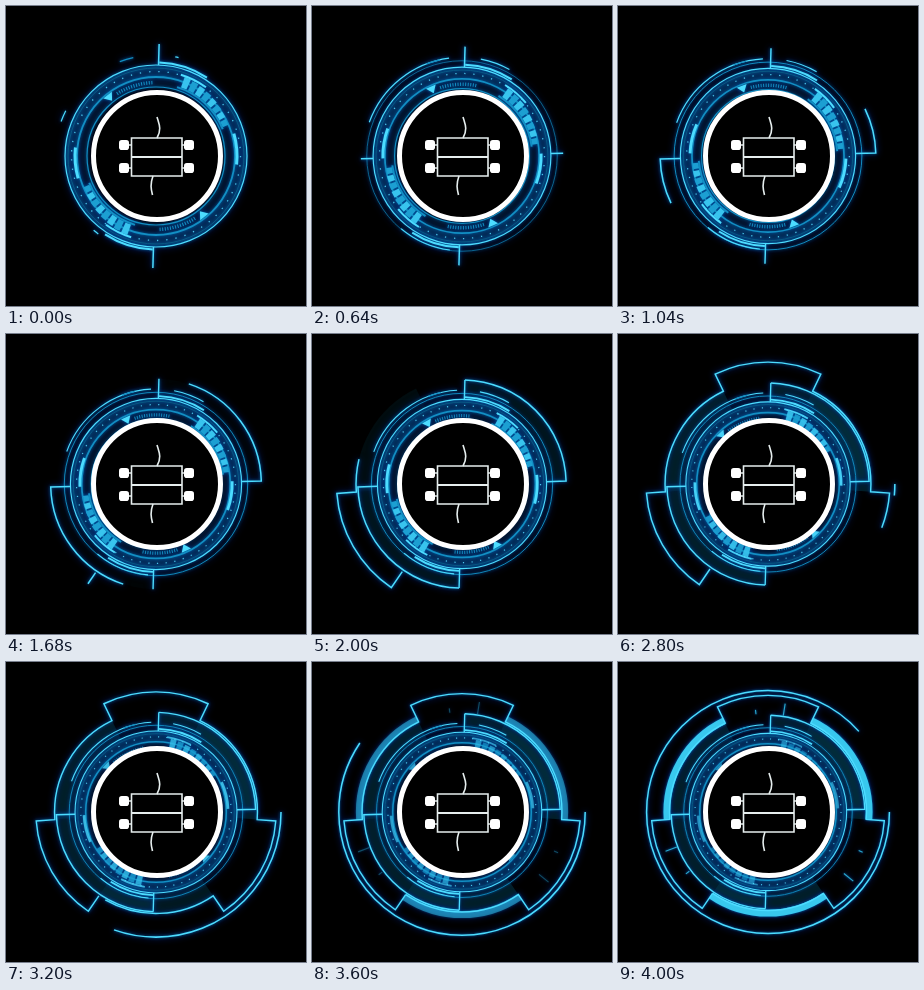
These frames come from a looping animation (300x300 px, 4.08 s). An HTML page:

```html
<!DOCTYPE html>
<html lang="en">
<head>
<meta charset="utf-8">
<title>HUD ring</title>
<style>
html, body { margin: 0; width: 100%; height: 100%; overflow: hidden; background: #000; }
svg { display: block; width: 100vw; height: 100vh; }
#lines { filter: drop-shadow(0 0 1.5px #0068a8) drop-shadow(0 0 3.5px #001a70); }
</style>
</head>
<body>
<svg viewBox="0 0 300 300">
  <g id="zoom" fill="none">
    <g id="back"></g>
    <g id="lines">
      <g id="rings"></g>
      <g id="spin"></g>
      <g id="outer"></g>
    </g>
  </g>
  <circle cx="151" cy="150" r="63.5" fill="#000" stroke="#fff" stroke-width="5"/>
  <g fill="none" stroke="#e6eeee" stroke-width="1.6">
    <path d="M125.5 132H176V170H125.5ZM122 139H126M122 162H126M176 139H180M176 162H180"/>
    <path d="M125 151H176" stroke-width="2.2"/>
    <path d="M151 132C156 123 153 118 151 111M147 170C144 178 145 183 146.500 189"/>
    <g fill="#fff" stroke="none" id="wheels"></g>
  </g>
</svg>
<script>
const LOOP = 4080, STEP = 80;
const CYAN = '#4cdcff', BLUE = '#128fc4', DIM = '#0a5a84', SHADE = '#053a46';
const $ = id => document.getElementById(id);
const clamp = v => Math.max(0, Math.min(1, v));

function add(parent, tag, attrs) {
  const el = document.createElementNS('http://www.w3.org/2000/svg', tag);
  for (const k in attrs) el.setAttribute(k, attrs[k]);
  return $(parent).appendChild(el);
}

function pt(r, deg) {
  const a = deg * Math.PI / 180;
  return (r * Math.cos(a)).toFixed(2) + ' ' + (r * Math.sin(a)).toFixed(2);
}

// Arc continuing from the current point, already at radius r and angle a.
function sweep(r, a, b) {
  const large = Math.abs(b - a) > 180 ? 1 : 0;
  return `A${r} ${r} 0 ${large} ${b > a ? 1 : 0} ${pt(r, b)}`;
}
const arc = (r, a, b) => 'M' + pt(r, a) + sweep(r, a, b);
const spoke = (r, q, a) => `M${pt(r, a)}L${pt(q, a)}`;
const sector = (r, q, a, b) =>
  arc(r, a, b) + 'L' + pt(q, b) + sweep(q, b, a) + 'Z';

const line = (parent, d, stroke, width, extra) =>
  add(parent, 'path', { d, stroke, 'stroke-width': width, ...extra });
const ring = (parent, r, stroke, width, extra) =>
  add(parent, 'circle', { r, stroke, 'stroke-width': width, ...extra });
const shade = d => add('back', 'path', { d, fill: SHADE, opacity: 0 });
const trace = (d, width) =>
  line('outer', d, CYAN, width, { pathLength: 1, 'stroke-dasharray': '0 2' });
const draw = (el, p) => el.setAttribute('stroke-dasharray', clamp(p) + ' 2');
const fade = (el, p) => el.setAttribute('opacity', clamp(p));

// Concentric rings
ring('back', 85, '#043450', 12);
ring('back', 74, '#02141f', 10);
ring('rings', 91, CYAN, 1.2);
ring('rings', 88, DIM, 1);
ring('rings', 84.5, '#48c4ec', 1.3, { 'stroke-dasharray': '1.3 8' });
ring('rings', 79, BLUE, 1.8);
ring('rings', 69, BLUE, 1.2);
const wide = ring('rings', 97.5, BLUE, 1);

// Rotating blocks, hatching and pointers, mirrored through the centre
for (const m of [0, 180]) {
  for (let i = 0; i < 8; i++) {
    const a = 290 + m + i * 6;
    line('spin', arc(78.5 - i * 0.4, a, a + 4.6), i % 2 ? '#1c9fd2' : '#38c4ee', 11 - i * 0.7);
  }
  line('spin', arc(72, 287 + m, 338 + m), BLUE, 2);
  line('spin', arc(85, 287 + m, 306 + m), CYAN, 2);
  line('spin', arc(81, 344 + m, 366 + m), CYAN, 3);
  line('spin', arc(73.5, 238 + m, 268 + m), BLUE, 3.5, { 'stroke-dasharray': '1 1.6' });
  add('spin', 'path', {
    d: `M${pt(78, 227.500 + m)}L${pt(78, 235.500 + m)}L${pt(70.5, 231.5 + m)}Z`, fill: CYAN
  });
}

// Quarter brackets and the arcs around the rings
const fills = [], quarters = [];
for (const m of [0, 180]) {
  fills.push(shade(sector(112, 91, m - 88.4, m - 1.6)));
  line('outer', spoke(91, 112, m - 88.4), CYAN, 1.5);
  line('outer', arc(93.5, m - 88, m - 57), CYAN, 2);
  quarters.push(trace(spoke(91, 112, m - 1.6) + sweep(112, m - 1.6, m - 88.4), 1.6));
}
const sideArcs = [
  trace(arc(101, 200, 267), 1.2),
  trace(arc(101, 281, 300), 1.2),
  trace(arc(97, 130, 95), 1.2)
];
line('outer', arc(101, 249, 257), BLUE, 1.3);

// Three-lobed outline
const LOBE = 25.7, R_OUT = 135, R_IN = 114;
let gearPath = 'M' + pt(R_IN, 150 - LOBE);
const bands = [], ticks = [], lobeFills = [];
for (const c of [150, 270, 390]) {
  const a = c - LOBE, b = c + LOBE, next = c + 120 - LOBE;
  gearPath += 'L' + pt(R_OUT, a) + sweep(R_OUT, a, b) +
    'L' + pt(R_IN, b) + sweep(R_IN, b, next);
  lobeFills.push(shade(sector(R_IN, 91, b, next)));
  bands.push(line('outer', arc(117, b, next), '#38c8ee', 8, { opacity: 0 }));
  ticks.push(line('outer',
    spoke(113, 127, c + 9) + spoke(114, 119, c - 7), '#2aa8d0', 1.3, { opacity: 0 }));
}
const gear = trace(gearPath, 1.6);
const orbit = trace(arc(140.5, 0, 179.9) + sweep(140.5, 179.9, 359.8), 1.7);

for (const x of [118, 183])
  for (const y of [139, 162])
    add('wheels', 'rect', { x: x - 5, y: y - 5, width: 10, height: 10, rx: 2.8 });

function turn(t) {
  if (t < 1.1) return 18 * Math.sin(t / 1.1 * Math.PI / 2);
  return 18 - 13.5 * (1 - Math.cos(clamp((t - 1.1) / 2.3) * Math.PI));
}

function render(ms) {
  const t = ms / 1000;
  $('zoom').setAttribute('transform',
    `translate(150 150) scale(${Math.exp(-0.0365 * t)})`);
  $('spin').setAttribute('transform', `rotate(${turn(t)})`);
  fade($('spin'), 1 - 0.5 * clamp((t - 2.6) / 1.2));
  fade(wide, (t - 0.1) / 0.8);
  quarters.forEach(q => draw(q, (t - 0.55) * 140 / 190.7));
  sideArcs.forEach(s => draw(s, 0.1 + t * 1.3));
  fills.forEach(f => fade(f, 0.55 * clamp((t - 1.6) / 0.6)));
  lobeFills.forEach((f, i) => fade(f, 0.55 * clamp((t - 1.8 - i * 0.5) / 0.5)));
  draw(gear, (t - 1.655) / 1.56);
  draw(orbit, (t - 2.78) * 261 / 359.8);
  bands.forEach(b => fade(b, (t - 3.3) / 0.6));
  ticks.forEach(k => fade(k, (t - 3.4) / 0.5));
}

const start = performance.now();
function frame() {
  const ms = (performance.now() - start) % LOOP;
  render(Math.floor(ms / STEP) * STEP);
  requestAnimationFrame(frame);
}
frame();
</script>
</body>
</html>
```
